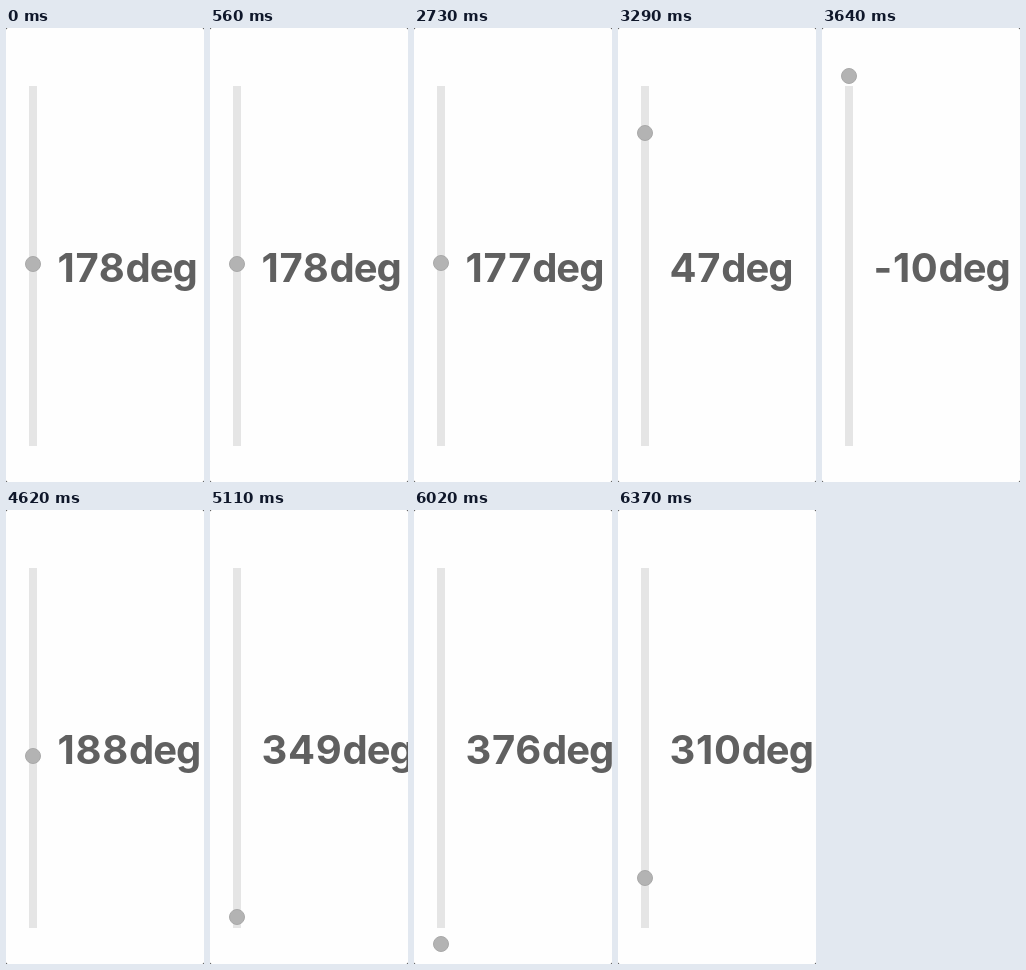
Write an HTML page that moves like this. It is 198 by 454 pixels and loops after 7000 ms.

```html
<!DOCTYPE html>
<html lang="en">
<head>
<meta charset="utf-8">
<title>Angle slider</title>
<style>
  html, body { margin: 0; width: 100%; height: 100%; overflow: hidden; background: #fff; }
  svg { display: block; width: 100%; height: 100%; }
  text { font: 700 40px Inter, "Liberation Sans", sans-serif; fill: #606060; }
  #value { letter-spacing: 0.7px; }
  #unit { letter-spacing: -1px; }
</style>
</head>
<body>
<svg viewBox="0 0 198 454">
  <rect width="198" height="454" fill="#fefefe"/>
  <path d="M0 0h1.5L0 1.5zM198 0v1.5l-1.5-1.5zM0 454v-1.5l1.5 1.5zM198 454h-1.5l1.5-1.5z" fill="#555"/>
  <rect x="23" y="58" width="8" height="360" fill="#e5e5e5"/>
  <circle id="knob" cx="27" r="7.5" fill="#b3b3b3" stroke="#a9a9a9"/>
  <text x="51.5" y="253.5"><tspan id="value"></tspan><tspan id="unit">deg</tspan></text>
</svg>
<script>
const LOOP = 7000, STEP = 70, TOP = 58;
const knob = document.getElementById('knob');
const value = document.getElementById('value');

// Drag path: [time in ms, angle]
const keys = [
  [2660, 178], [2730, 177], [3290, 47], [3640, -10], [3780, -15],
  [3990, -15], [4620, 188], [4760, 263], [5110, 349], [5390, 381],
  [5950, 381], [6370, 310]
];
const last = keys.length - 1;

const slope = i => (keys[i + 1][1] - keys[i][1]) / (keys[i + 1][0] - keys[i][0]);

// Tangent that never overshoots: harmonic mean of the neighbouring slopes.
function tangent(i) {
  if (i === 0 || i === last) return 0;
  const a = slope(i - 1), b = slope(i);
  return a * b > 0 ? 2 * a * b / (a + b) : 0;
}

function angleAt(t) {
  let i = 0;
  while (i < last - 1 && t >= keys[i + 1][0]) i++;
  const [t0, v0] = keys[i], [t1, v1] = keys[i + 1];
  const h = t1 - t0;
  const u = Math.min(1, Math.max(0, (t - t0) / h)), w = 1 - u;
  return v0 * w * w * (1 + 2 * u) + v1 * u * u * (1 + 2 * w)
    + h * u * w * (w * tangent(i) - u * tangent(i + 1));
}

function draw(ms) {
  const t = Math.floor((ms % LOOP) / STEP) * STEP;
  const deg = Math.round(angleAt(t));
  knob.setAttribute('cy', TOP + deg);
  value.textContent = deg;
}

const start = performance.now();
function tick() {
  draw(performance.now() - start);
  requestAnimationFrame(tick);
}
tick();
</script>
</body>
</html>
```
